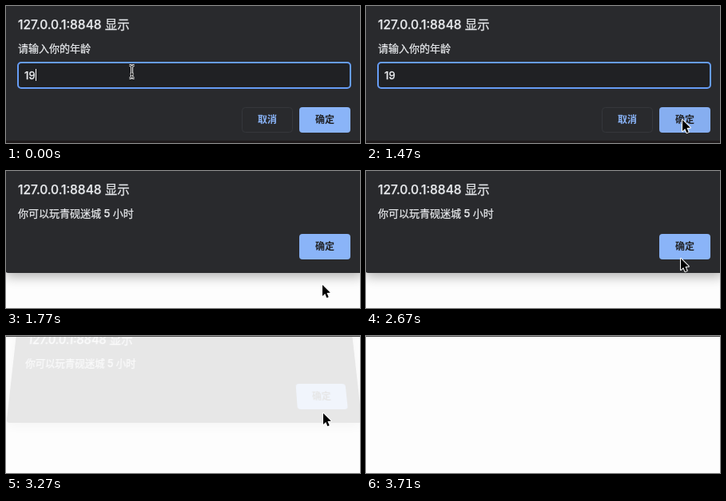
Animation of 443 by 172 pixels, one loop 4160 ms. Source, as an HTML page with a canvas:

```html
<!DOCTYPE html>
<html lang="zh-CN">
<head>
<meta charset="utf-8">
<title>年龄输入对话框</title>
<style>
html, body { margin: 0; width: 100%; height: 100%; overflow: hidden; background: #fdfdfd; }
canvas { display: block; width: 443px; height: 172px; }
</style>
</head>
<body>
<canvas id="stage" width="443" height="172"></canvas>
<script>
const W = 443, H = 172, LOOP = 4160;
const PAD = 20, LW = W + 2 * PAD, LH = 200, MID = 223;
const FONT = 'Inter, "Noto Sans CJK SC", "Noto Sans CJK", sans-serif';
const PAGE = '#fdfdfd', PANEL = '#292a2d', INK = '#e8eaed';
const BLUE = '#8ab4f8', HOVER = '#84a7e8', PRESS = '#86aef0';
const ctx = document.getElementById('stage').getContext('2d');

// [start, scene, pointer x, pointer y, button colour, caret]
const STEPS = [
  [0, 'prompt', 157, 82, BLUE, true],
  [150, 'prompt', 157, 82, BLUE, false],
  [440, 'prompt', 293, 128, BLUE, false],
  [590, 'prompt', 348, 133, BLUE, false],
  [740, 'prompt', 376, 132, BLUE, true],
  [880, 'prompt', 377, 130, HOVER, true],
  [1030, 'prompt', 378, 130, HOVER, true],
  [1180, 'prompt', 378, 130, HOVER, false],
  [1320, 'prompt', 396, 143, HOVER, false],
  [1470, 'prompt', 396, 143, PRESS, false],
  [1620, 'swap', 396, 143, PRESS, false],
  [1770, 'alert', 396, 143, BLUE],
  [2220, 'alert', 392, 136, BLUE],
  [2370, 'alert', 390, 122, BLUE],
  [2520, 'alert', 390, 116, BLUE],
  [2670, 'alert', 394, 110, BLUE],
  [2820, 'alert', 396, 101, HOVER],
  [2970, 'alert', 397, 97, HOVER],
  [3120, 'alert', 397, 97, PRESS],
  [3270, 'leave', 397, 97, PRESS],
  [3420, 'blank', 398, 116],
  [3570, 'blank', 410, 161],
  [3710, 'blank']
];

// Layers are wider than the stage because the dialog overhangs it.
function layer() {
  const c = document.createElement('canvas');
  c.width = LW;
  c.height = LH;
  const g = c.getContext('2d');
  g.translate(PAD, 0);
  return g;
}
const promptLayer = layer(), alertLayer = layer();

function text(g, str, x, y, size, color, weight = 500) {
  g.font = `${weight} ${size}px ${FONT}`;
  g.fillStyle = g.strokeStyle = color;
  g.fillText(str, x, y);
  if (weight < 700) {
    g.lineWidth = .25;
    g.strokeText(str, x, y);
  }
}

function box(g, x, y, w, h, r, fill, line, width = 1) {
  g.beginPath();
  g.roundRect(x, y, w, h, r);
  if (fill) { g.fillStyle = fill; g.fill(); }
  if (line) { g.strokeStyle = line; g.lineWidth = width; g.stroke(); }
}

function panel(g, bottom) {
  g.clearRect(-PAD, 0, LW, LH);
  g.save();
  g.shadowColor = 'rgba(0,0,0,.33)';
  g.shadowBlur = 15;
  g.shadowOffsetY = 4;
  box(g, -1, -20, 448, bottom + 20, 4, PANEL);
  g.restore();
  text(g, '127.0.0.1:8848 显示', 15, 28.5, 15.5, INK);
}

function okButton(g, y, color) {
  box(g, 367, y, 64, 32, 4, color);
  text(g, '确定', 387, y + 20, 12, '#202124', 700);
}

function paintPrompt(color, caret, focus) {
  const g = promptLayer;
  panel(g, 175);
  text(g, '请输入你的年龄', 15, 58, 13, INK);
  box(g, 15, 71, 416, 32, 4, '#202124', focus ? '#669df6' : null, 2);
  text(g, '19', 23, 91.5, 13, INK);
  if (caret) {
    g.fillStyle = '#fff';
    g.fillRect(37, 79, 1, 15);
  }
  box(g, 295.5, 127.5, 63, 31, 4, null, '#35373b');
  text(g, '取消', 315, 147, 12, BLUE, 700);
  okButton(g, 127, color);
}

function paintAlert(color) {
  panel(alertLayer, 128);
  text(alertLayer, '你可以玩青砚迷城 5 小时', 15, 58, 13, INK);
  okButton(alertLayer, 79, color);
}

// Tilted dialog: each row is narrowed a little more towards the top.
function tilt(g, lift, top, slope, alpha) {
  ctx.globalAlpha = alpha;
  for (let y = 0; y < H && y + lift < LH; y++) {
    const s = Math.min(1, top + slope * y);
    ctx.drawImage(g.canvas, 0, y + lift, LW, 1, MID - (MID + PAD) * s, y, LW * s, 1);
  }
  ctx.globalAlpha = 1;
}

function topLine() {
  ctx.fillStyle = '#484848';
  ctx.fillRect(0, 0, W, 1);
}

function arrow(x, y) {
  const pts = [[0, 0], [0, 14], [3.2, 11], [5.4, 16.2], [7.7, 15.2], [5.5, 10.1], [9.8, 9.8]];
  ctx.beginPath();
  for (const [a, b] of pts) ctx.lineTo(x + a, y + b);
  ctx.closePath();
  ctx.lineJoin = 'round';
  ctx.strokeStyle = '#fff';
  ctx.lineWidth = 2;
  ctx.stroke();
  ctx.fillStyle = '#000';
  ctx.fill();
}

function beam(x, y) {
  ctx.beginPath();
  for (const s of [-1, 1]) {
    ctx.moveTo(x - 3, y + 8 * s);
    ctx.quadraticCurveTo(x, y + 8 * s, x, y + 5.5 * s);
    ctx.quadraticCurveTo(x, y + 8 * s, x + 3, y + 8 * s);
  }
  ctx.moveTo(x, y - 6);
  ctx.lineTo(x, y + 6);
  ctx.moveTo(x - 2, y + 3);
  ctx.lineTo(x + 2, y + 3);
  ctx.lineJoin = 'round';
  for (const [color, width] of [['#fff', 3], ['#000', 1]]) {
    ctx.strokeStyle = color;
    ctx.lineWidth = width;
    ctx.stroke();
  }
}

function draw(t) {
  const [, scene, x, y, color, caret] = STEPS.findLast(s => s[0] <= t);
  ctx.fillStyle = PAGE;
  ctx.fillRect(0, 0, W, H);
  if (scene === 'prompt') {
    paintPrompt(color, caret, true);
    ctx.drawImage(promptLayer.canvas, -PAD, 0);
    ctx.fillStyle = '#1e1a1b';
    ctx.fillRect(0, 169, W, 3);
  } else if (scene === 'swap') {
    paintPrompt(color, false, false);
    paintAlert(BLUE);
    tilt(promptLayer, 7, .973, .00016, .65);
    tilt(alertLayer, 16, .951, .0004, .19);
    topLine();
  } else if (scene === 'alert') {
    paintAlert(color);
    ctx.drawImage(alertLayer.canvas, -PAD, 0);
  } else if (scene === 'leave') {
    paintAlert(color);
    tilt(alertLayer, 19, .939, .0005, .1);
    topLine();
  } else {
    topLine();
  }
  if (x === undefined) return;
  if (t < 440) beam(x + .5, y + .5);
  else arrow(x, y);
}

const start = performance.now();
function tick() {
  draw((performance.now() - start) % LOOP);
  requestAnimationFrame(tick);
}
tick();
</script>
</body>
</html>
```
